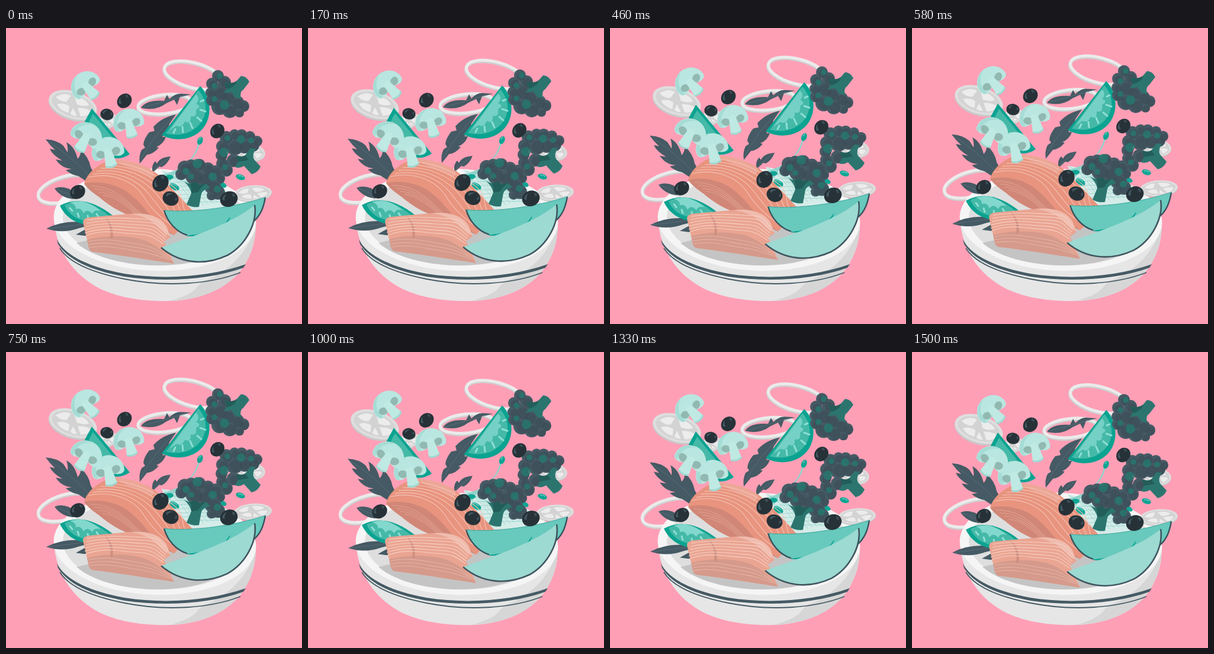
Recreate the animation shown at these times as an HTML page. Size 500 by 500 pixels, loop 1540 ms.

```html
<!DOCTYPE html>
<html lang="en">
<head>
<meta charset="utf-8">
<title>Salad bowl</title>
<style>
html, body { margin: 0; width: 100%; height: 100%; overflow: hidden; background: #ff9fb6; }
svg { display: block; width: 100%; height: 100%; }
</style>
</head>
<body>
<svg viewBox="0 0 500 500" xmlns="http://www.w3.org/2000/svg">
<defs>
  <g id="mushroom">
    <path d="M-27 3C-31-13-17-28 0-28S31-13 27 3C25 9 16 9 10 6H-10C-16 9-25 9-27 3Z" fill="#b9e6e0"/>
    <path d="M-26 3C-30-13-17-27 0-27C-17-20-22-9-20 7Q-24 7-26 3Z" fill="#a5dcd5"/>
    <ellipse cx="-13" cy="-1" rx="8" ry="6.500" transform="rotate(24 -13 -1)" fill="#91b9b1"/>
    <ellipse cx="13" cy="-1" rx="8" ry="6.500" transform="rotate(-24 13 -1)" fill="#91b9b1"/>
    <path d="M-6-8Q0-13 6-8Q8 8 10 20Q0 27-10 20Q-8 8-6-8Z" fill="#bfe9e3"/>
    <path d="M-10 19Q0 25 10 19V22Q0 28-10 22Z" fill="#9fd8d1"/>
  </g>
  <g id="olive">
    <ellipse rx="14" ry="12" fill="#263238"/>
    <path d="M-10-3Q-7-9 0-9Q-6-6-7 0Z" fill="#455a64"/>
    <ellipse cx="9" cy="-3" rx="2" ry="3" fill="#3c4d56"/>
  </g>
  <g id="onion">
    <ellipse cy="2" rx="42" ry="24" fill="#c9c9c9"/>
    <ellipse rx="42" ry="23" fill="#dedede"/>
    <ellipse rx="37" ry="19" fill="#d3d3d3"/>
    <path d="M-32-4Q-20-17-8-14L-12-2Q-22 2-32-4ZM-2-15Q18-17 26-8Q18-2 6-3ZM9 2Q24-3 33 1Q30 12 18 14ZM-26 7Q-14 0-5 4L-3 15Q-18 16-26 7ZM2 5L12 15Q6 18 0 15Z" fill="#ececec"/>
  </g>
</defs>
<rect width="500" height="500" fill="#ff9fb6"/>
<g class="bob" id="back"></g>

<g id="bowl">
  <path d="M81 318C82 372 112 417 160 441C200 459 240 462 282 461C333 458 378 438 401 403C416 380 422 358 422 330Z" fill="#e6e6e6"/>
  <path d="M276 461C333 459 378 438 401 403C416 380 422 358 422 330C414 372 380 410 338 426C318 434 330 447 276 461Z" fill="#d6d6d6"/>
  <path d="M86 357C100 386 145 405 200 415C270 426 345 420 405 399L401 405C345 425 270 430 200 420C142 409 105 392 88 365Z" fill="#455a64"/>
  <path d="M91 372C106 396 145 413 200 424C270 438 345 433 396 413" fill="none" stroke="#455a64" stroke-width="1.800"/>
  <ellipse cx="251.500" cy="324" rx="171" ry="86" transform="rotate(2 251 324)" fill="#f5f5f5"/>
  <ellipse cx="252" cy="324" rx="156" ry="77" transform="rotate(2 252 324)" fill="#dedede"/>
  <path d="M119 363C150 390 210 402 262 401C320 400 372 382 397 352L262 330Z" fill="#c4c4c4"/>
</g>

<g class="bob">
  <g id="rings"></g>

  <g id="onions">
    <use href="#onion" transform="translate(113 130) rotate(18)"/>
    <use href="#onion" transform="translate(170 158) rotate(-20) scale(.45 .5)"/>
    <use href="#onion" transform="translate(414 210) rotate(8) scale(.57 .62)"/>
    <use href="#onion" transform="translate(417 279) rotate(-4) scale(.76 .58)"/>
  </g>

  <g id="leaves" fill="#455a64">
    <path d="M67 188Q86 189 97 199L104 210Q105 201 102 193Q116 200 121 221Q127 215 126 206Q140 218 143 235L151 250L139 261L122 250Q110 248 101 240L111 238Q94 237 84 222L95 224Q78 214 74 204L83 206Q74 198 67 188Z"/>
    <path d="M82 271Q99 264 118 279L114 289Q93 287 82 271Z"/>
    <path d="M68 339Q95 324 134 328L140 334L124 338Q96 348 68 339ZM118 349L136 339L140 352Z"/>
    <path d="M287 146Q263 151 249 167L251 174L242 176Q233 187 232 197L235 202L229 206Q224 216 226 229L238 214Q249 213 258 202L254 201Q266 196 270 184L264 184Q274 173 276 162Z"/>
    <path d="M247 241Q246 231 252 225L255 229Q260 218 278 217Q273 230 263 235L259 234L248 244Z"/>
    <path d="M228 135Q237 121 267 123L272 113L276 120Q286 110 296 111L313 112L294 116L289 130L284 121L271 127Q253 141 228 135Z"/>
    <path d="M72 192Q112 218 145 254M85 272L114 284M72 339L133 331M284 149Q250 180 228 221M275 219L249 240M232 134Q270 123 308 113" fill="none" stroke="#5d727c" stroke-width=".8"/>
  </g>

  <g id="dressing">
    <path d="M263 241C300 246 355 263 391 285L360 306H290Z" fill="#d5ece9"/>
    <g id="net" fill="none" stroke="#72c7bd" stroke-width=".7" opacity=".75"></g>
    <path d="M327 194Q323 218 300 233Q286 242 277 260L263 248Q288 243 306 227Q321 213 325 193Z" fill="#8fd3cb"/>
    <g fill="#0fa594">
      <ellipse cx="328" cy="190.500" rx="4.500" ry="7" transform="rotate(22 328 190)"/>
      <ellipse cx="396" cy="252" rx="8" ry="4.500" transform="rotate(18 396 252)"/>
      <ellipse cx="284.500" cy="268" rx="9" ry="5" transform="rotate(30 284 268)"/>
      <ellipse cx="276" cy="252" rx="7" ry="4"/>
      <ellipse cx="366" cy="265" rx="7" ry="4" transform="rotate(25 366 265)"/>
    </g>
    <path d="M392 250Q396 248 401 252M279 264Q284 263 289 268M326 189L329 185" fill="none" stroke="#68cbbf" stroke-width="1.500"/>
  </g>

  <g id="tomatoes">
    <path d="M328 98C345 115 349 145 336 165C322 187 290 195 263 181Z" fill="#0ba391"/>
    <path d="M325 105C340 122 341 144 329 160C316 178 292 184 270 178Z" fill="#45b9a8"/>
    <path d="M321 112Q329 120 321 128Q332 132 321 138Q323 152 312 149Q313 164 302 158Q297 170 288 165L276 173Z" fill="#75d1c5"/>
    <path d="M329 124L334 122M328 138L337 141M323 151L330 157M311 160L315 169M298 167L299 176M286 171L283 177" stroke="#8edfd5" stroke-width="3" stroke-linecap="round"/>
    <path d="M145 136L209 213Q197 222 180 220Q145 205 133 158Z" fill="#0ba391"/>
    <path d="M147 145L201 211Q160 204 140 158Z" fill="#45b9a8"/>
    <path d="M91 300Q132 278 182 318C164 339 110 341 91 300Z" fill="#0ba391"/>
    <path d="M99 299Q132 282 174 317C153 331 112 331 99 299Z" fill="#45b9a8"/>
    <path d="M108 295Q133 286 160 309Q148 306 146 314Q137 304 131 313Q126 302 118 306Q119 298 108 295Z" fill="#82d8cd"/>
    <path d="M108 304L112 309M121 313L123 319M138 317L139 323M153 314L157 320" stroke="#8edfd5" stroke-width="3" stroke-linecap="round"/>
  </g>

  <g id="salmon">
    <path d="M132 263C137 242 164 224 183 222C215 224 242 235 256 247C276 267 299 290 319 313L284 350C262 340 250 325 232 322C200 318 175 300 158 286C145 277 138 271 132 263Z" fill="#e8947f"/>
    <path d="M132 263C151 258 180 261 202 275C224 290 234 306 248 321L284 350C262 340 250 327 232 322C200 318 175 300 158 286C145 277 138 271 132 263Z" fill="#d18777"/>
    <path d="M183 222C210 223 233 231 249 243Q252 252 243 253C226 238 199 237 183 222Z" fill="#eca797"/>
    <g id="backLines" fill="none" stroke="#f5c3b5" stroke-width="1.100"></g>
    <path d="M130 328Q130 322 139 320L205 314C239 311 262 319 271 335L278 353L267 361L284 398C238 391 190 383 146 378Q140 376 139 367L137 358Z" fill="#eaa592"/>
    <path d="M137 358C165 350 204 350 229 357Q257 365 284 398C238 391 190 383 146 378Q140 376 139 367Z" fill="#d59a8b"/>
    <path d="M209 314C240 311 262 319 271 335L278 352Q266 345 256 335C244 323 230 317 209 314Z" fill="#efbcae"/>
    <path d="M166 318Q184 333 180 357L176 355Q179 335 166 318Z" fill="#cf8f80"/>
    <g id="frontLines" fill="none" stroke="#f6cfc3" stroke-width="1.100"></g>
  </g>

  <g id="broccoli"></g>

  <g id="melon" stroke-linejoin="round">
    <path d="M267 308C318 313 389 302 438 286C434 306 430 316 419 326C390 344 340 355 307 350C287 344 273 327 267 308Z" fill="#68c9bd"/>
    <path d="M306 351C340 348 368 338 378 320C372 339 343 354 306 351Z" fill="#00a290" stroke="#00a290"/>
    <path d="M267 308C273 328 287 344 306 350M438 286C435 304 430 316 419 326" fill="none" stroke="#37535d" stroke-width="2.400"/>
    <path d="M267 308C318 313 389 302 438 286" fill="none" stroke="#37a99c" stroke-width="1"/>
    <path d="M262 371C294 358 375 336 420 299C425 329 405 367 374 384C335 402 294 398 262 371Z" fill="#9cdad2"/>
    <path d="M262 371C294 398 335 402 374 384C405 367 425 329 420 299" fill="none" stroke="#405660" stroke-width="2.600"/>
  </g>

  <g id="mushrooms">
    <use href="#mushroom" transform="translate(137 100) rotate(-42) scale(.96)"/>
    <use href="#mushroom" transform="translate(208 163) rotate(-15) scale(.95)"/>
    <use href="#mushroom" transform="translate(173 212) rotate(-14)"/>
    <use href="#mushroom" transform="translate(134 187) rotate(29)"/>
  </g>
  <g id="olives"></g>
</g>
</svg>
<script>
const $ = id => document.getElementById(id);
const bobs = document.querySelectorAll('.bob');
const LOOP = 1540, STEPS = 37, RISE = 9.7;

const circle = (x, y, r, fill, extra = '') =>
  `<circle cx="${x}" cy="${y}" r="${r}" fill="${fill}" ${extra}/>`;

function ring(x, y, rx, ry, tilt) {
  const oval = (dy, color, width) =>
    `<ellipse cy="${dy}" rx="${rx}" ry="${ry}" stroke="${color}" stroke-width="${width}"/>`;
  return `<g transform="translate(${x} ${y}) rotate(${tilt})" fill="none">` +
    oval(1.5, '#cfcfcf', 6) + oval(-0.5, '#ebebeb', 5) + '</g>';
}

// lobes and tints are "x y r" triples
function broccoli(lobes, tints, stem, shade) {
  const each = (s, fn) => s.split(',').map(p => fn(...p.trim().split(' ').map(Number))).join('');
  return each(lobes, (x, y, r) => circle(x, y, r, '#455a64')) +
    each(lobes, (x, y, r) => circle(x + 2, y + 2, r * 0.72, '#3a4b54', 'opacity=".55"')) +
    `<path d="${stem}" fill="#2c756f"/><path d="${shade}" fill="#235d59"/>` +
    each(tints, (x, y, r) => circle(x, y, r, '#25786f', 'opacity=".8"'));
}

// a family of evenly shifted curves
function lines(n, shape) {
  let out = '';
  for (let i = 0; i < n; i++) out += `<path d="${shape(i)}"/>`;
  return out;
}

$('back').innerHTML = ring(101, 272, 48, 21, -16);
$('rings').innerHTML = ring(316, 80, 50, 21, 15) + ring(268, 129, 45, 16, -6);

$('net').innerHTML =
  lines(9, i => `M${266 + i * 7} ${242 + i * 3}Q${300 + i * 5} ${262 + i * 2} ${318 + i * 8} ${304 - i * 2}`) +
  lines(7, i => `M${274 + i * 3} ${254 + i * 7}Q${325 + i * 2} ${250 + i * 7} ${350 + i * 5} ${265 + i * 5}`);

$('backLines').innerHTML =
  lines(6, i => `M${139 + i * 7} ${252 - i * 5}C${180 + i * 7} ${243 - i * 3} ${216 + i * 6} ${259 - i * 3} ${232 + i * 9} ${284 - i * 4}S${262 + i * 6} ${321 - i * 4} ${286 + i * 4} ${338 - i * 5}`) +
  '<g stroke="#df9f8f">' +
  lines(4, i => `M${142 + i * 7} ${267 + i * 5}C${170 + i * 4} ${266 + i * 6} ${194 + i * 3} ${281 + i * 6} ${211 + i * 2} ${298 + i * 5}S${235 + i} ${319 + i * 2} 252 330`) + '</g>';

$('frontLines').innerHTML =
  lines(6, i => `M${132 + i} ${352 - i * 5.5}C${165 + i * 3} ${338 - i * 4} ${193 + i * 4} ${347 - i * 5} ${219 + i * 4} ${348 - i * 5}S${250 + i * 2} ${354 - i * 4} ${266 + i * 1.5} ${365 - i * 4}`) +
  '<g stroke="#e4b2a5">' +
  lines(3, i => `M${139 + i} ${361 + i * 5}C170 ${353 + i * 6} 200 ${362 + i * 6} 222 ${365 + i * 6}S258 ${375 + i * 5} ${272 + i * 3} ${386 + i * 3}`) + '</g>';

$('broccoli').innerHTML =
  broccoli('358 81 10,348 94 10,346 109 9,348 122 10,361 133 14,378 139 13,394 143 8,401 132 10,390 126 12,369 92 11,361 109 14,374 118 13',
    '369 130 8,352 98 5,361 81 5,352 120 5',
    'M369 92Q383 95 390 89L397 81Q406 81 411 91L401 104Q394 108 397 120L387 117L381 108L367 110L373 103Z',
    'M369 92Q383 95 390 89L388 95Q381 102 373 103Z') +
  broccoli('372 185 11,366 200 11,364 215 10,365 229 10,372 240 11,386 180 9,398 181 10,412 183 9,424 191 9,386 200 15,403 199 13,417 198 11,384 224 11',
    '368 210 8,397 188 7,414 190 5,374 186 5,370 235 5',
    'M389 215Q399 219 404 215L413 203L422 204Q415 214 419 222L430 234Q426 244 415 247L402 233Q394 238 387 235L392 226Z',
    'M389 215Q399 219 404 215L410 223Q400 225 392 226Z') +
  broccoli('302 236 12,296 247 10,313 233 11,327 231 10,341 238 11,354 243 11,361 254 9,318 250 15,335 254 14,349 267 14,358 278 12,347 283 8',
    '323 229 8,304 242 6,349 251 7,357 272 6,313 251 5',
    'M300 259Q311 266 319 260L327 265L338 263L345 270Q332 273 330 280L326 302Q315 304 305 298L313 279Q311 268 300 259Z',
    'M319 260L327 265L338 263Q328 270 325 277L313 279Q314 270 311 264Z');

$('olives').innerHTML = [
  [200, 123, 0.95, -45], [170.5, 146, 0.8, 10], [357, 174, 0.93, -50], [261, 262, 1.07, -52],
  [278, 288, 0.98, 25], [121, 277, 0.95, -35], [376.500, 289, 1.08, -22]
].map(([x, y, s, a]) => `<use href="#olive" transform="translate(${x} ${y}) rotate(${a}) scale(${s})"/>`).join('');

function draw(ms) {
  const step = Math.floor(((ms + 5) % LOOP) / LOOP * STEPS);
  const y = -RISE * (1 - Math.cos(2 * Math.PI * step / STEPS)) / 2;
  bobs.forEach(g => g.setAttribute('transform', `translate(0 ${y.toFixed(2)})`));
}

const start = performance.now();
function tick(now) {
  draw(Math.max(0, now - start));
  requestAnimationFrame(tick);
}
draw(0);
requestAnimationFrame(tick);
</script>
</body>
</html>
```
